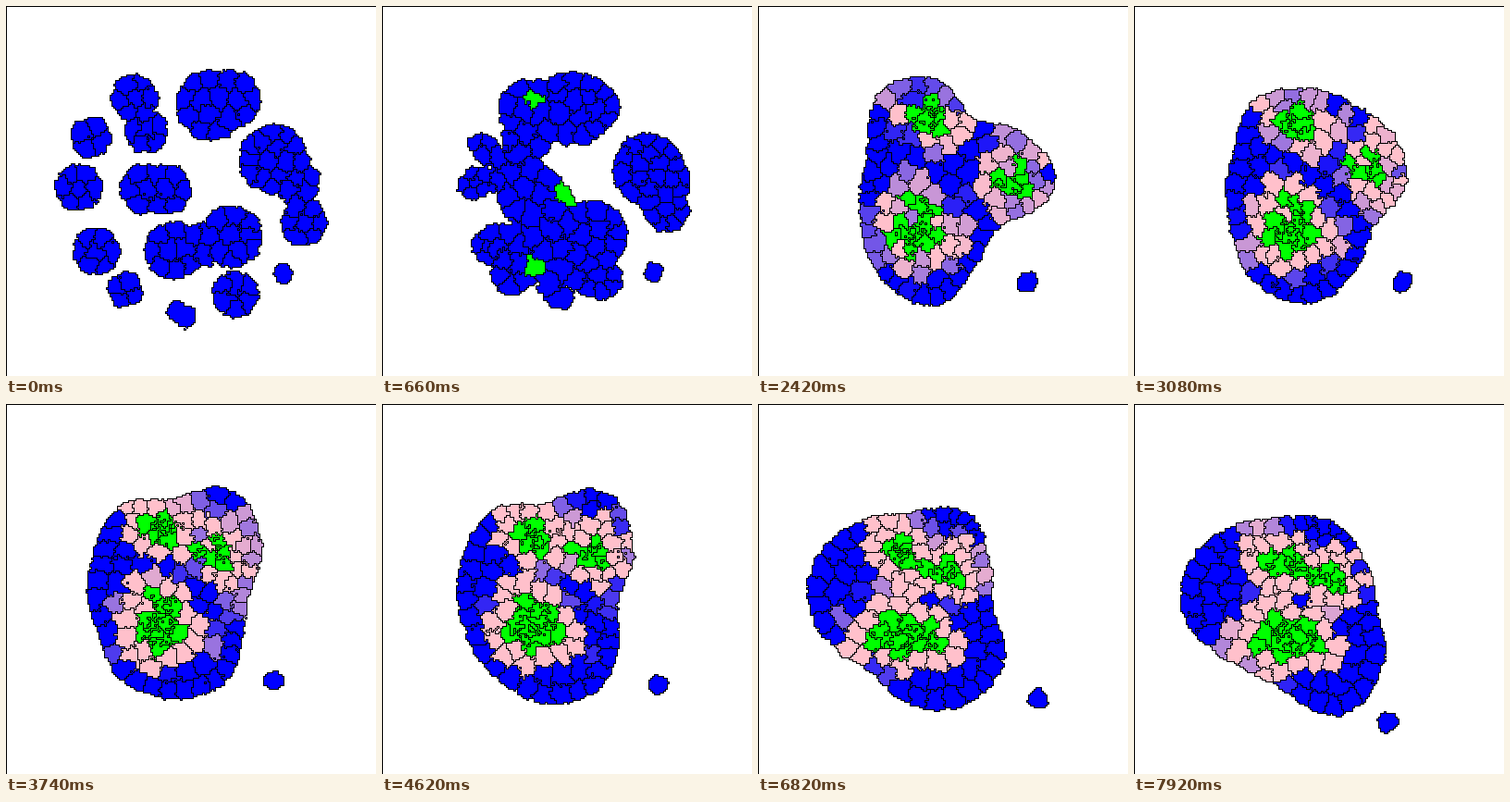
Animation of 400 by 400 pixels, one loop 8000 ms. Source, as a matplotlib script:

```python
import numpy as np
import matplotlib.pyplot as plt
from matplotlib.animation import FuncAnimation

# Adhesive cells on a 2 px lattice: clusters merge, sort and differentiate.
SIZE, SITES, STEP_MS, TICK_MS, LOOP_MS = 400, 201, 220, 20, 8000
STEPS = 37
KEYS = [0, 7, 11, 17, 25, 31, 36]
SPACING = 19.2
BLUE = np.array([0, 0, 255.0])
PINK = np.array([255, 192, 203.0])
GREEN = np.array([0, 255, 0.0])

rng = np.random.default_rng(12)
axis = 2 * np.arange(SITES) - 0.5
X, Y = np.meshgrid(axis, axis)

# Discs (x, y, radius): separate clusters, then a crescent beside an island
CLUSTERS = [(92, 142, 22), (139, 99, 25), (152, 136, 23), (222, 107, 38),
            (243, 101, 32), (290, 166, 37), (315, 192, 24), (322, 234, 25),
            (78, 196, 25), (150, 198, 26), (173, 198, 27), (181, 264, 31),
            (212, 258, 24), (244, 249, 33), (98, 265, 25), (129, 307, 19),
            (184, 331, 12), (196, 336, 12), (248, 312, 25)]
CRESCENT = [(188, 106, 50), (160, 140, 34), (140, 178, 36), (152, 215, 36),
            (180, 256, 62), (195, 258, 62), (155, 275, 38), (296, 189, 43)]

# Merged tissue: centre, then radii every 30 degrees, clockwise from the right
TISSUE = [
    (190, 195, [130, 84, 95, 129, 114, 90, 79, 82, 117, 116, 85, 113]),
    (180, 205, [82, 88, 112, 113, 109, 92, 92, 97, 110, 102, 129, 110]),
    (172, 215, [76, 97, 119, 113, 93, 96, 97, 104, 112, 101, 136, 109]),
    (165, 220, [89, 117, 121, 105, 82, 92, 110, 115, 107, 102, 118, 98]),
    (160, 225, [104, 125, 128, 83, 74, 85, 108, 114, 106, 102, 111, 105])]

# Differentiated groups: cell count, then one ellipse (x, y, rx, ry) per key
GROUPS = [
    (5, [(195, 103, 30, 18), (187, 119, 23, 22), (168, 134, 22, 22),
         (161, 152, 20, 23), (156, 159, 19, 17), (168, 171, 28, 18)]),
    (5, [(296, 190, 26, 32), (280, 187, 25, 22), (227, 160, 24, 21),
         (233, 161, 24, 22), (204, 180, 28, 19), (212, 187, 24, 18)]),
    (10, [(174, 235, 52, 60), (172, 236, 31, 42), (168, 235, 25, 40),
          (164, 241, 40, 29), (160, 250, 42, 27), (167, 252, 40, 28)])]
LONER = [(299, 288), (284, 285), (292, 297), (290, 299), (308, 309), (303, 319),
         (274, 345)]


def discs(items, scale=1.0):
    """Depth inside a union of discs whose centres are drawn together."""
    return np.max([r - np.hypot(X - 200 - (x - 200) * scale,
                                Y - 195 - (y - 195) * scale)
                   for x, y, r in items], axis=0)


def blob(cx, cy, radii):
    """Depth inside a smooth closed curve through evenly spaced radii."""
    r, n = np.array(radii, float), len(radii)
    u = np.arctan2(Y - cy, X - cx) / (2 * np.pi) * n
    i = np.floor(u).astype(int)
    t = u - i
    a, b, c, d = (r[(i + k) % n] for k in (-1, 0, 1, 2))
    rim = b + 0.5 * t * (c - a + t * (2 * a - 5 * b + 4 * c - d
                                      + t * (3 * (b - c) + d - a)))
    return rim - np.hypot(X - cx, Y - cy)


def slots(key):
    """Sunflower arrangement of each group inside its ellipse."""
    out = []
    for n, ellipses in GROUPS:
        x, y, rx, ry = ellipses[key]
        k = np.arange(n)
        r, a = np.sqrt((k + 0.5) / n), k * 2.39996
        out.append(np.stack([x + r * (rx - 4) * np.cos(a),
                             y + r * (ry - 4) * np.sin(a)], 1))
    return np.concatenate(out)


def hex_points(field):
    """Evenly packed points inside the tissue."""
    rows = np.arange(0, SIZE, SPACING * np.sqrt(3) / 2)
    pts = np.array([(x + SPACING / 2 * (j % 2), y) for j, y in enumerate(rows)
                    for x in np.arange(0, SIZE, SPACING)])
    i, j = np.minimum(np.round(pts / 2).astype(int), SITES - 1).T
    return pts[field[j, i] > 0]


def match(a, b):
    """For each point of a, the index of its own partner in b."""
    d = np.hypot(*(a[:, None] - b[None]).transpose(2, 0, 1))
    pick = np.zeros(len(a), int)
    for _ in a:
        i, j = np.unravel_index(np.argmin(d), d.shape)
        pick[i] = j
        d[i], d[:, j] = np.inf, np.inf
    return pick


def nearest(px, py, seeds):
    d = (px[:, None] - seeds[:, 0])**2 + (py[:, None] - seeds[:, 1])**2
    who = d.argmin(1)
    return who, np.sqrt(d[np.arange(len(who)), who])


def relax(seeds, field, free, rounds):
    """Even out the free cells inside the tissue."""
    px, py = X[field > 0], Y[field > 0]
    for _ in range(rounds):
        who, _d = nearest(px, py, seeds)
        n = len(seeds)
        count = np.bincount(who, minlength=n)
        sums = np.stack([np.bincount(who, p, n) for p in (px, py)], 1)
        full = free & (count > 0)
        seeds[full] = sums[full] / count[full, None]
        for k in np.flatnonzero(free & (count == 0)):
            j = np.argmin(np.hypot(px - seeds[k, 0], py - seeds[k, 1]))
            seeds[k] = px[j], py[j]
    return seeds


def noise(blurs):
    n = rng.standard_normal(X.shape)
    for _ in range(blurs):
        for ax in (0, 1):
            n = (np.roll(n, 1, ax) + 2 * n + np.roll(n, -1, ax)) / 4
    return n / n.std()


def jitter():
    return 0.7 * noise(0) + 1.1 * noise(1) + 1.4 * noise(6)


def blend(values, step):
    """Linear mix of the values at the two surrounding keys."""
    k = min(np.searchsorted(KEYS, step, "right") - 1, len(KEYS) - 2)
    e = (step - KEYS[k]) / (KEYS[k + 1] - KEYS[k])
    return (1 - e) * np.asarray(values[k], float) + e * np.asarray(values[k + 1], float)


def paint(labels, colours):
    """Two pixels per site, black wherever neighbouring sites differ."""
    pad = np.pad(labels, ((0, 1), (0, 1)), mode="edge")
    s, r, d, q = pad[:-1, :-1], pad[:-1, 1:], pad[1:, :-1], pad[1:, 1:]
    img = colours[labels].repeat(2, 0).repeat(2, 1)
    img[::2, 1::2][s != r] = 0
    img[1::2, ::2][s != d] = 0
    img[1::2, 1::2][(s != q) | (r != d)] = 0
    return img[1:SIZE + 1, 1:SIZE + 1].astype(np.uint8)


def simulate():
    fields = [discs(CLUSTERS), discs(CRESCENT)] + [blob(*t) for t in TISSUE]
    seeds = hex_points(fields[0])
    n = len(seeds)
    seeds = relax(seeds, fields[0], np.ones(n, bool), 15)

    paths = [slots(k) for k in range(len(KEYS) - 1)]
    chosen = match(paths[0], seeds)
    paths.insert(0, seeds[chosen].copy())

    free = np.ones(n, bool)
    free[chosen] = False
    onset = np.full(n, STEPS)
    onset[chosen] = rng.integers(3, 9, len(chosen))
    level = np.zeros(n)
    rate = rng.uniform(0.1, 0.22, n)
    reach = rng.uniform(23, 36, n)

    images = []
    for step in range(STEPS):
        fields[0] = discs(CLUSTERS, 1 - 0.03 * min(step, KEYS[1]))
        field = blend(fields, step)
        if step:
            seeds[chosen] = blend(paths, step)
            seeds = relax(seeds, field, free, 8)

        # Cells close to differentiated ones turn pink, the others fade back
        green = onset <= step
        if step >= KEYS[1]:
            gap = nearest(seeds[:, 0], seeds[:, 1], seeds[green])[1]
            level = np.clip(level + np.where(gap < reach, rate, -0.1), 0, 1)

        # Labels: 0 medium, 1..n cells, n+1 the lone cell, n+2 the frame
        qx, qy = X + jitter(), Y + jitter()
        labels = np.zeros(X.shape, int)
        near = field > -6
        who, d = nearest(qx[near], qy[near], seeds)
        edge = field[near] + 0.35 * (11 - d) + noise(1)[near]
        labels[near] = np.where(edge > 0, who + 1, 0)

        # Ragged borders between differentiated cells
        core = np.isin(labels, np.flatnonzero(green) + 1)
        who, _d = nearest(qx[core] + 4 * noise(1)[core],
                          qy[core] + 4 * noise(1)[core], seeds)
        labels[core] = np.where(green[who], who + 1, labels[core])

        lx, ly = blend(LONER, step)
        lone = np.hypot(X - lx, Y - ly) + 0.6 * noise(1) + 0.8 * noise(6)
        labels[lone < 10.5] = n + 1
        labels[0], labels[:, 0] = n + 2, n + 2

        cells = BLUE + level[:, None] * (PINK - BLUE)
        cells[green] = GREEN
        white = np.full((1, 3), 255.0)
        images.append(paint(labels, np.concatenate([white, cells, BLUE[None], white])))
    return images


images = simulate()

fig = plt.figure(figsize=(4, 4), dpi=100)
ax = fig.add_axes([0, 0, 1, 1])
ax.axis("off")
picture = ax.imshow(images[0], interpolation="nearest", aspect="auto")


def update(tick):
    picture.set_data(images[tick * TICK_MS // STEP_MS])
    return [picture]


anim = FuncAnimation(fig, update, frames=LOOP_MS // TICK_MS, interval=TICK_MS,
                     repeat=True, repeat_delay=0)
plt.show()
```
